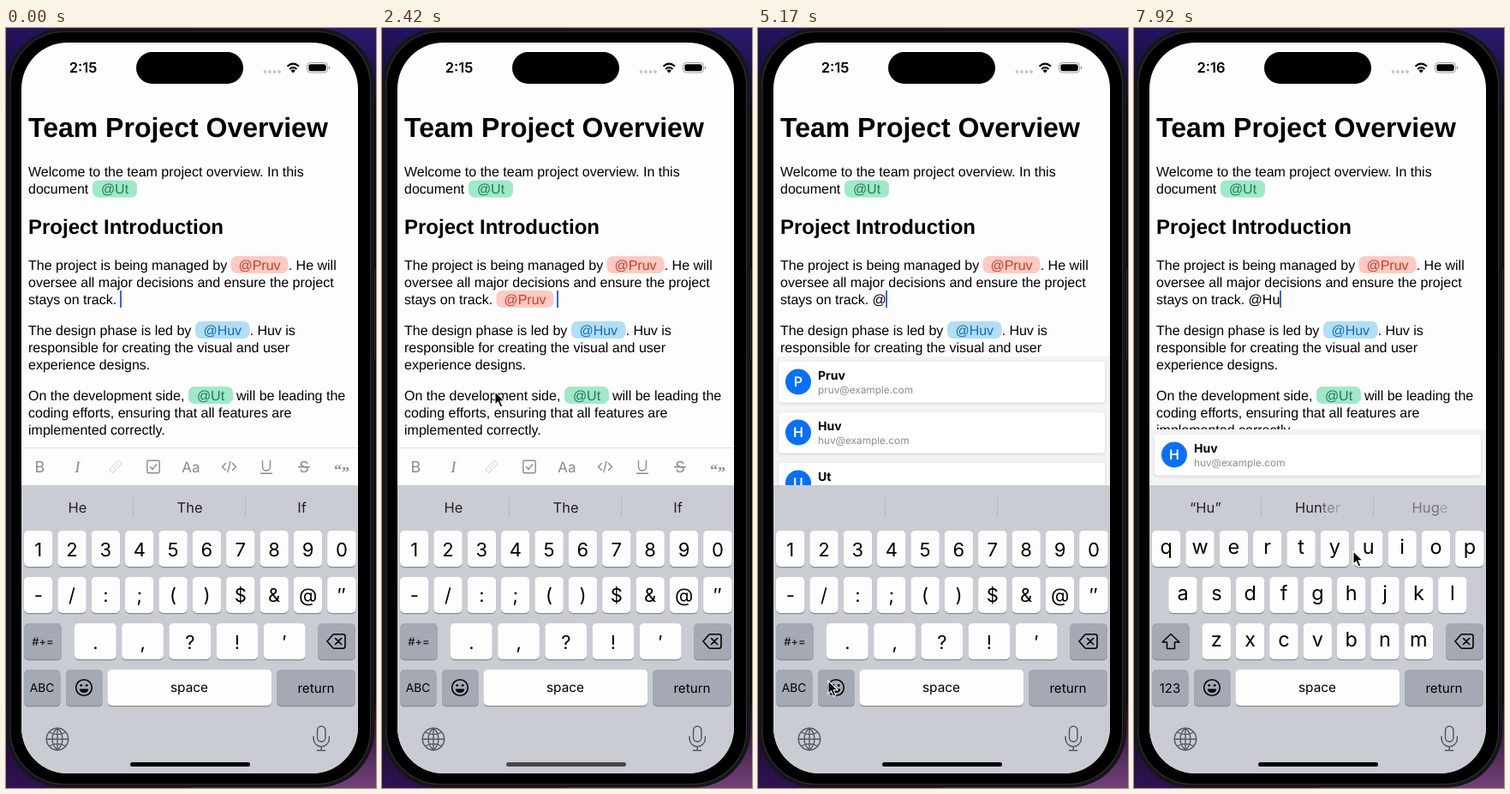
An HTML page that plays this animation: 432x886 px, repeating every 8000 ms.

```html
<!DOCTYPE html>
<html lang="en">
<head>
<meta charset="utf-8">
<title>Mentions editor</title>
<style>
html, body { margin: 0; width: 100%; height: 100%; overflow: hidden; background: #0c0a12; }
svg { display: block; width: 100vw; height: 100vh; }
text { font-family: Inter, Roboto, sans-serif; text-rendering: geometricPrecision; white-space: pre; }
.doc text { font-family: "Liberation Sans", Arial, sans-serif; font-size: 16px; }
.doc .h1 { font-size: 32px; font-weight: 700; }
.doc .h2 { font-size: 24px; font-weight: 700; }
.mid { text-anchor: middle; }
.line { fill: none; stroke-linecap: round; stroke-linejoin: round; }
</style>
</head>
<body>
<svg id="stage" viewBox="0 0 432 886" preserveAspectRatio="none"></svg>
<script>
const LOOP = 8000;
const PEOPLE = {
  Pruv: { bg: '#ffcac1', ink: '#d03b2b', width: 67 },
  Huv: { bg: '#b0def8', ink: '#1769c0', width: 63.5 },
  Ut: { bg: '#9fe8c8', ink: '#1c7d54', width: 52 }
};

const rect = (x, y, w, h, r, fill, extra = '') =>
  `<rect x="${x}" y="${y}" width="${w}" height="${h}" rx="${r}" fill="${fill}" ${extra}/>`;
const circle = (x, y, r, fill, extra = '') => `<circle cx="${x}" cy="${y}" r="${r}" fill="${fill}" ${extra}/>`;
const text = (x, y, s, extra = '') => `<text x="${x}" y="${y}" ${extra}>${s}</text>`;
const label = (x, y, s, size, fill = '#000', extra = '') =>
  text(x, y, s, `class="mid" font-size="${size}" fill="${fill}" ${extra}`);
const line = (d, color, width = 1.4, extra = '') =>
  `<path class="line" d="${d}" stroke="${color}" stroke-width="${width}" ${extra}/>`;
const group = (id, body, extra = '') => `<g id="${id}" ${extra}>${body}</g>`;

function chip(x, y, name) {
  const { bg, ink, width } = PEOPLE[name];
  return rect(x, y - 10, width, 20, 7, bg) + text(x + width / 2, y + 5.6, '@' + name, `class="mid" fill="${ink}"`);
}

function backdrop() {
  const stops = list => list.map(([o, c]) => `<stop offset="${o}" stop-color="${c}"/>`).join('');
  return `<defs>
    <linearGradient id="left" x2="0" y2="1">${stops([[0, '#24125f'], [.1, '#140c2c'], [.11, '#0b0a12'], [.88, '#0b0a12'], [.9, '#170a28'], [1, '#2f1250']])}</linearGradient>
    <linearGradient id="right" x2="0" y2="1">${stops([[0, '#2c1a70'], [.1, '#140c2c'], [.11, '#0b0a12'], [.88, '#0b0a12'], [.9, '#25112e'], [1, '#74407c']])}</linearGradient>
    <clipPath id="screen">${rect(18, 17, 393, 852, 54, '#000')}</clipPath>
    <filter id="soft" x="-5%" y="-20%" width="110%" height="150%"><feDropShadow dx="0" dy="1" stdDeviation="1.5" flood-opacity=".16"/></filter>
  </defs>` + rect(0, 0, 216, 886, 0, 'url(#left)') + rect(216, 0, 216, 886, 0, 'url(#right)') +
    rect(428, 280, 3, 107, 1, '#29292c') +
    rect(.5, .5, 429.5, 885, 66, '#161618') +
    rect(5, 4.5, 420.5, 877, 63, '#000', 'stroke="#2d2d30" stroke-width="1.2"');
}

function statusBar() {
  const dots = [302.5, 308, 313.5, 319].map(x => circle(x, 51, 1.9, '#c6c6c9')).join('');
  return rect(152, 28, 125, 37, 18.5, '#000') + label(90, 52.3, '', 16.5, '#000', 'id="clock" font-weight="600"') + dots +
    line('M328.5 44.8Q335.2 38.6 341.9 44.8M331 48Q335.2 44.4 339.4 48', '#000', 2.2, 'style="stroke-linecap:butt"') +
    '<path d="M332.5 49.5Q335.2 47.6 337.9 49.5L335.2 52.4Z"/>' +
    rect(351.5, 40.5, 24, 11.5, 3.8, 'none', 'stroke="#a2a2a5"') + rect(353.3, 42.3, 20.4, 7.9, 2.3, '#000') +
    rect(376.8, 44.3, 1.4, 4, .7, '#a2a2a5');
}

function documentBody() {
  const at = (y, s, x = 26) => text(x, y + 5.6, s);
  return text(26, 127.3, 'Team Project Overview', 'class="h1"') +
    at(167.5, 'Welcome to the team project overview. In this') +
    at(187.5, 'document') + chip(101, 187.5, 'Ut') +
    text(26, 239.6, 'Project Introduction', 'class="h2"') +
    at(276, 'The project is being managed by') + chip(262.5, 276, 'Pruv') + at(276, '. He will', 329.7) +
    at(296, 'oversee all major decisions and ensure the project') +
    at(316, 'stays on track.') + text(133.6, 321.6, '', 'id="typed"') +
    group('newChip', chip(133.5, 316, 'Pruv')) +
    rect(133, 306, 2, 20, .5, '#2f6ae6', 'id="caret"') +
    at(352, 'The design phase is led by') + chip(221, 352, 'Huv') + at(352, '. Huv is', 284.5) +
    at(372, 'responsible for creating the visual and user') +
    at(392, 'experience designs.') +
    at(428, 'On the development side,') + chip(213, 428, 'Ut') + at(428, 'will be leading the', 269) +
    at(448, 'coding efforts, ensuring that all features are') +
    at(468, 'implemented correctly.');
}

function toolbar() {
  const grey = '#8b8b8e';
  return rect(18, 489, 393, 44, 0, '#fdfdfd') + rect(18, 489, 393, 1, 0, '#e3e3e6') +
    label(39.5, 518, 'B', 18, grey) +
    label(83.5, 518, 'I', 19, grey, 'style="font-family:\'Liberation Serif\',serif;font-style:italic"') +
    group('link', line('M-1 -3h-4a3 3 0 0 0 0 6h4M1 -3h4a3 3 0 0 1 0 6h-4M-3 0h6', '#dfdfe2', 1.3), 'transform="translate(128 511.5) rotate(-45)"') +
    rect(164.8, 504.3, 14.4, 14.4, 2, 'none', `stroke="${grey}" stroke-width="1.4"`) +
    line('M168.5 511.8l2.6 2.6 4.6-5.6', grey) +
    label(216, 518, 'Aa', 17, grey) +
    line('M256.5 507.5l-4 4 4 4M264.5 507.5l4 4-4 4M262 505.5l-3 12', grey) +
    line('M299.5 504.5v7a4.5 4.5 0 0 0 9 0v-7M297.5 519.3h13', grey) +
    label(348, 518, 'S', 18, grey) + line('M341.5 511.7h13', grey) +
    label(392, 521, '“<tspan dy="3">”</tspan>', 18, grey, 'font-weight="700" style="font-family:\'Liberation Serif\',serif"');
}

function card(y, name) {
  return rect(24, y, 381, 47.5, 4, '#fff', 'filter="url(#soft)"') +
    circle(47, y + 23.5, 15, '#0570fb') + label(47, y + 29.2, name[0], 16, '#fff', 'font-weight="600"') +
    text(70, y + 21.3, name, 'font-size="14" font-weight="700"') +
    text(70, y + 37, name.toLowerCase() + '@example.com', 'font-size="11.8" fill="#8c8c8f"');
}

const popup = (top, names) => rect(18, top, 393, 533 - top, 0, '#f3f3f4') +
  names.map((name, i) => card(top + 6 + i * 59, name)).join('');

const keycap = (x, y, w, special) =>
  rect(x, y + 1.2, w, 42, 5, '#888b92') + rect(x, y, w, 42, 5, special ? '#a4a9b4' : '#fdfdfe');

function keyRow(chars, x, y, pitch, width, size, base) {
  return [...chars].map((c, i) => keycap(x + i * pitch, y, width) +
    label(x + i * pitch + width / 2, y + base, c.replace('&', '&amp;'), size)).join('');
}

function letterKeys(rows, size, base, shifted) {
  return keyRow(rows[0], 21, 586, 39.35, 33.4, size, base) + keyRow(rows[1], 40.3, 640, 39.35, 33.4, size, base) +
    keyRow(rows[2], 79.5, 694, 39.35, 33.4, size, base) +
    keycap(21, 694, 44, !shifted) +
    line('M43 706.5l10 9.5h-5.5v7.5h-9v-7.5H33z', '#000', 1.5, shifted ? 'style="fill:#000"' : '') +
    label(42, 774.5, '123', 15);
}

function keyboard() {
  const ink = '#565960';
  const upper = ['QWERTYUIOP', 'ASDFGHJKL', 'ZXCVBNM'];
  const lower = upper.map(row => row.toLowerCase());
  const faded = (s, opacity) => `<tspan fill-opacity="${opacity}">${s}</tspan>`;
  const hints = words => words.map((s, i) => label(83.5 + i * 131, 564.7, s, 16.5, '#222')).join('');
  return rect(18, 533, 393, 336, 0, '#c9ccd3') +
    rect(148, 547, 1, 24, 0, '#b3b6bd') + rect(279, 547, 1, 24, 0, '#b3b6bd') +
    group('hintsStart', hints(['He', 'The', 'If'])) +
    group('hintsFirst', hints(['“H”', 'He', 'How'])) +
    group('hintsSecond', hints(['“Hu”', 'Hun' + faded('t', .6) + faded('e', .4) + faded('r', .25), faded('Hug', .5) + faded('e', .25)])) +
    keycap(21, 748, 42.5, true) + keycap(70, 748, 43, true) + keycap(118.5, 748, 191.5) + keycap(316, 748, 92, true) +
    keycap(364, 694, 44, true) +
    group('symbols', keyRow('1234567890', 21, 586, 39.35, 33.4, 22, 30) + keyRow('-/:;()$&@″', 21, 640, 39.35, 33.4, 22, 29) +
      keyRow('.,?!′', 80, 694, 55.2, 48.7, 22, 30) + keycap(21, 694, 44, true) +
      label(43, 720, '#+=', 13) + label(42, 774, 'ABC', 13.8)) +
    group('upper', letterKeys(upper, 22, 30, true)) +
    group('lower', letterKeys(lower, 23.5, 27, false)) +
    line('M375 715l6.5-7.5q.8-.8 2-.8h10q2.5 0 2.5 2.5v11.6q0 2.5-2.5 2.5h-10q-1.2 0-2-.8zM384.5 711.5l7 7M391.5 711.5l-7 7', '#000', 1.6) +
    circle(91, 769, 9.3, 'none', 'stroke="#000" stroke-width="1.6"') + circle(87.8, 766.3, 1.4, '#000') + circle(94.2, 766.3, 1.4, '#000') +
    '<path d="M85.700 770.500h10.600a5.300 4.600 0 0 1-10.600 0z"/>' +
    label(214, 773.5, 'space', 15.4) + label(362, 774.5, 'return', 15.2) +
    circle(60, 829, 12.7, 'none', `stroke="${ink}" stroke-width="1.5"`) +
    line('M60 816.3v25.4M47.3 829h25.4M50.5 821q9.5 5 19 0M50.5 837q9.5-5 19 0M60 816.3c-8 7-8 18.4 0 25.4M60 816.3c8 7 8 18.4 0 25.4', ink, 1.4) +
    rect(363.5, 814, 9.4, 18, 4.7, 'none', `stroke="${ink}" stroke-width="1.5"`) +
    line('M359 826v2.5a9.2 9.2 0 0 0 18.4 0V826M368.2 837.7v4.5M363.5 842.2h9.4', ink, 1.5) +
    rect(145, 856, 140, 5, 2.5, '#000', 'id="home"');
}

const stage = document.getElementById('stage');
stage.innerHTML = backdrop() + group('display', rect(18, 17, 393, 852, 0, '#fdfdfd') + statusBar() +
  group('document', documentBody(), 'class="doc"') + toolbar() +
  group('allPeople', popup(383, Object.keys(PEOPLE))) + group('onePerson', popup(468, ['Huv'])) + keyboard(),
  'clip-path="url(#screen)"') +
  group('pointer', '<path d="M0 0v15.2l3.5-3.3 2.6 6 2.7-1.2-2.6-5.8h4.9z" stroke="#fff" stroke-width="1.1"/>');

const el = id => document.getElementById(id);
const show = (id, on) => { el(id).style.display = on ? '' : 'none'; };
const latest = (steps, t) => steps.filter(([start]) => t >= start).pop();

// start, typed text, chip shown, caret x, caret width
const EDITS = [
  [0, '', false, 133, 2], [1050, '@', false, 149, 2], [2050, '', true, 204, 2], [3600, '', true, 200, 3],
  [3950, '', false, 133, 2], [4600, '@', false, 149, 2], [6700, '@H', false, 161, 2], [7780, '@Hu', false, 170, 2]
];
const HINTS = [[0, 'hintsStart'], [3500, ''], [6750, 'hintsFirst'], [7800, 'hintsSecond']];
const LAYOUTS = [[0, 'symbols'], [5450, 'upper'], [6750, 'lower']];
const PATH = [
  [450, 432, 640], [950, 343, 661], [1400, 343, 661], [1950, 132, 424], [2550, 132, 424], [3250, 378, 716],
  [4050, 378, 716], [4450, 345, 661], [4750, 345, 661], [5170, 82, 761], [5350, 42, 766], [5650, 42, 766],
  [6250, 245, 678], [6450, 245, 678], [6650, 250, 668], [6950, 250, 668], [7600, 256, 610], [LOOP, 256, 610]
];

function pointerAt(t) {
  const next = PATH.findIndex(([time]) => time > t);
  const [t0, x0, y0] = PATH[next - 1], [t1, x1, y1] = PATH[next];
  const u = (t - t0) / (t1 - t0), k = u * u * (3 - 2 * u);
  return [x0 + (x1 - x0) * k, y0 + (y1 - y0) * k];
}

function render(t) {
  const [, typed, hasChip, caretX, caretWidth] = latest(EDITS, t);
  el('typed').textContent = typed;
  el('caret').setAttribute('x', caretX);
  el('caret').setAttribute('width', caretWidth);
  show('newChip', hasChip);
  show('allPeople', typed === '@');
  show('onePerson', typed.length > 1);
  const hint = latest(HINTS, t)[1], layout = latest(LAYOUTS, t)[1];
  ['hintsStart', 'hintsFirst', 'hintsSecond'].forEach(id => show(id, id === hint));
  ['symbols', 'upper', 'lower'].forEach(id => show(id, id === layout));
  el('home').setAttribute('opacity', t > 2300 && t < 2550 ? .65 : 1);
  el('clock').textContent = t < 7000 ? '2:15' : '2:16';
  const pointing = t >= PATH[0][0];
  show('pointer', pointing);
  if (pointing) el('pointer').setAttribute('transform', `translate(${pointerAt(t)})`);
}

const began = performance.now();
function tick() {
  render((performance.now() - began) % LOOP);
  requestAnimationFrame(tick);
}
tick();
</script>
</body>
</html>
```
